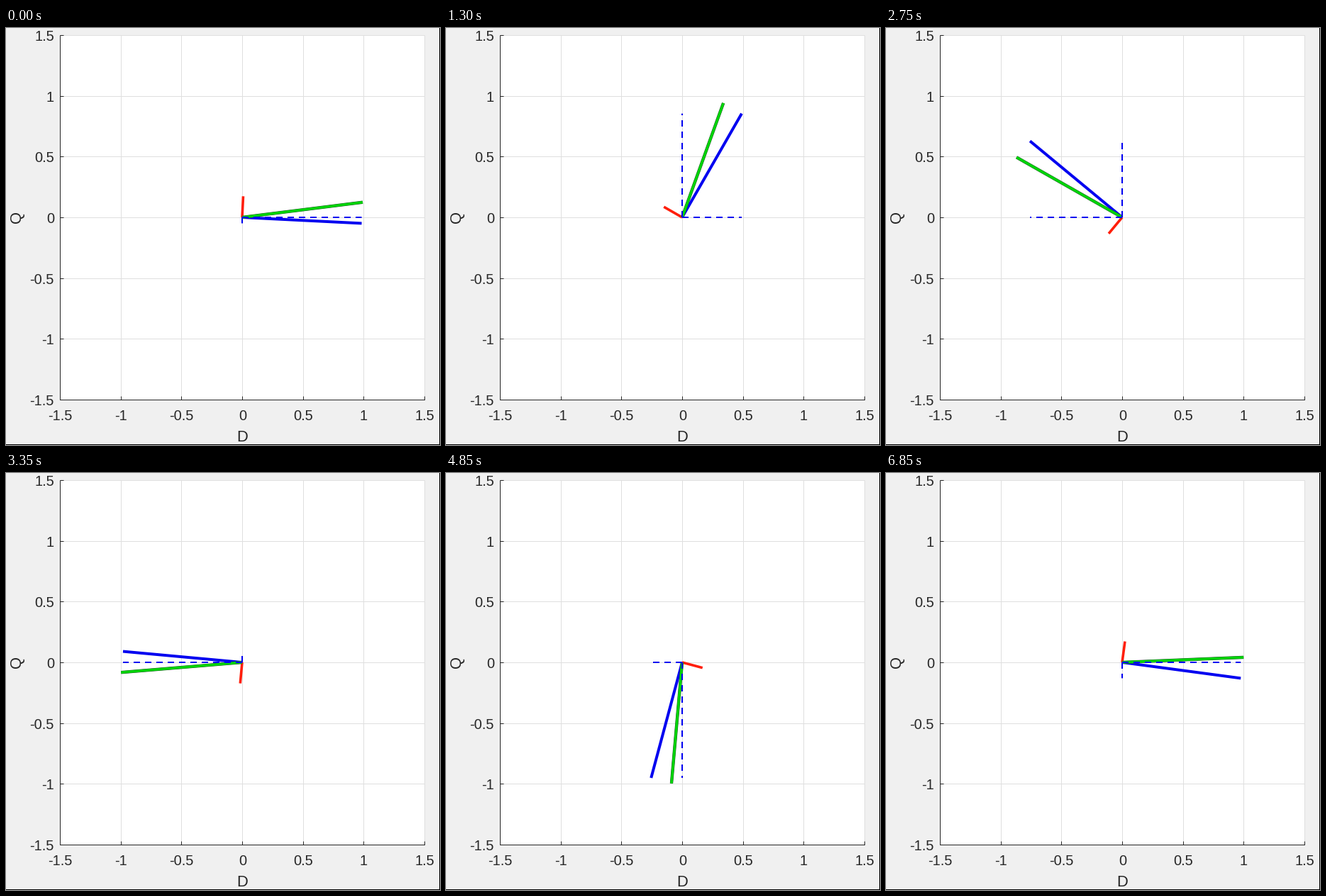
A matplotlib script for the animation above (6900 ms loop, 612 px wide and 588 px high).

```python
import numpy as np
import matplotlib.pyplot as plt
from matplotlib.animation import FuncAnimation

plt.rcParams["font.family"] = "Liberation Sans"

W, H, DPI = 612, 588, 100
PX = 72 / DPI                      # points per pixel
CX, CY = 333.5, 267.5              # plot centre in pixels
OX, OY = 333, 267                  # foot of the vectors
HALF = 257                         # half side of the plot
UNIT = HALF / 1.5
FRAMES, INTERVAL = 138, 50

STEP, START = 0.1, -0.05           # radians
LEAD = np.radians(10)              # angle from blue to green
PAUSES = np.array([11, 20, 41, 53, 58, 63])   # slots that repeat the last pose

INK = "#262626"
BLUE, GREEN, RED = "#0000f0", "#00d40a", "#ff1e0a"

fig = plt.figure(figsize=(W / DPI, H / DPI), dpi=DPI, facecolor="#f0f0f0")
ax = fig.add_axes([0, 0, 1, 1])
ax.set_xlim(0, W)
ax.set_ylim(H, 0)
ax.axis("off")


def line(xs, ys, color, width, z, **kw):
    # Unsnapped, so one-pixel lines stay on their pixel centres.
    return ax.plot(xs, ys, color=color, lw=width * PX, zorder=z, snap=False,
                   solid_capstyle="butt", dash_capstyle="butt", **kw)[0]


def label(x, y, text, size, **kw):
    ax.text(x, y, text, fontsize=size * PX, color=INK, **kw)


def draw_plot():
    left, right = CX - HALF, CX + HALF
    top, bottom = CY - HALF, CY + HALF
    ax.add_patch(plt.Rectangle((left, top), 2 * HALF, 2 * HALF, snap=False,
                               fc="white", ec="none", zorder=0))
    for v in np.arange(-1.5, 1.6, 0.5):
        x = np.floor(CX + v * UNIT) + 0.5
        y = np.floor(CY - v * UNIT) + 0.5
        line([x, x], [top, bottom], "#dfdfdf", 1, 1)
        line([left, right], [y, y], "#dfdfdf", 1, 1)
        line([x, x], [bottom, bottom - 5], INK, 1, 2)
        line([left, left + 5], [y, y], INK, 1, 2)
        label(x, 553, f"{v:g}", 20, ha="center", va="baseline")
        label(68, y + 7.5, f"{v:g}", 20, ha="right", va="baseline")
    line([left, left], [top, bottom + 0.5], INK, 1, 2)
    line([left, right + 0.5], [bottom, bottom], INK, 1, 2)
    label(CX, 583, "D", 22, ha="center", va="baseline")
    label(15.5, CY - 1, "Q", 22, ha="center", va="center", rotation=90)
    line([W - 0.5] * 2, [0, H], "black", 1, 2)
    line([0, W], [H - 0.5] * 2, "black", 1, 2)


draw_plot()
dashes = {"dashes": (4.5, 3.5)}    # 9 px on, 7 px off at 2 px width
red = line([], [], RED, 3.6, 3)
blue = line([], [], BLUE, 4, 4)
rim = line([], [], "#2c4a2c", 4.4, 5)
green = line([], [], GREEN, 3.6, 6)
d_part = line([], [], BLUE, 2, 7, **dashes)
q_part = line([], [], BLUE, 2, 7, **dashes)


def aim(artist, d, q):
    artist.set_data([OX, OX + d * UNIT], [OY, OY - q * UNIT])


def pose(frame):
    slot = max(0, (frame - 1) // 2)
    return START + STEP * (slot - np.count_nonzero(PAUSES <= slot))


def update(frame):
    a = pose(frame)
    d, q = np.cos(LEAD) * np.cos(a), np.cos(LEAD) * np.sin(a)
    aim(blue, d, q)
    aim(d_part, d, 0)
    aim(q_part, 0, q)
    aim(red, -np.sin(LEAD) * np.sin(a), np.sin(LEAD) * np.cos(a))
    for artist in (rim, green):
        aim(artist, np.cos(a + LEAD), np.sin(a + LEAD))
    return red, blue, rim, green, d_part, q_part


anim = FuncAnimation(fig, update, frames=FRAMES, interval=INTERVAL,
                     repeat=True, repeat_delay=0, blit=False)
plt.show()
```
